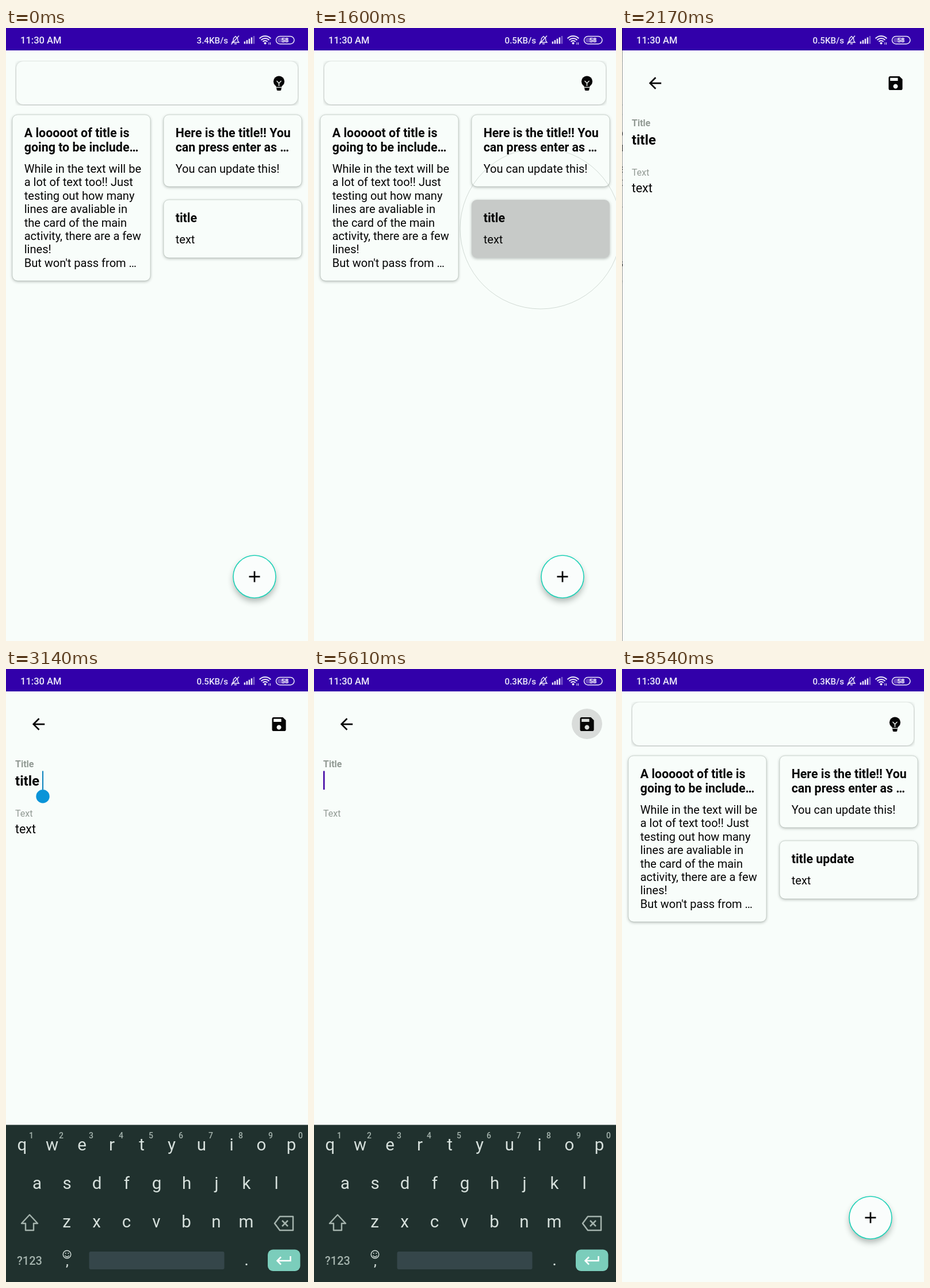
Recreate the animation shown at these times as an HTML page with a canvas. Size 525x1067 px, loop 8.57 s.

```html
<!DOCTYPE html>
<html lang="en">
<head>
<meta charset="utf-8">
<title>Notes app</title>
<style>
  html, body { margin: 0; width: 100%; height: 100%; overflow: hidden; background: #f8fdfa; }
  canvas { display: block; width: 525px; height: 1067px; }
</style>
</head>
<body>
<canvas id="stage" width="525" height="1067"></canvas>
<script>
const W = 525, H = 1067, LOOP = 8570;
const PAPER = '#f8fdfa', PURPLE = '#3200aa', INK = '#050505', HINT = '#929a94';
const ctx = document.getElementById('stage').getContext('2d');

// Moments of the interaction, in ms.
const T = { press: 1430, open: 1740, tap: 2650, keys: 2700, typing: 3500, perKey: 230,
            save: 5490, clear: 5560, close: 5770, toast: 6000, toastEnd: 8150 };
const SLIDE = 500, ADDED = 'update';

const BACK = new Path2D('M20 11H7.83l5.59-5.59L12 4l-8 8 8 8 1.41-1.41L7.83 13H20v-2z');
const DISK = new Path2D('M17 3H5c-1.11 0-2 .9-2 2v14c0 1.1.89 2 2 2h14c1.1 0 2-.9 2-2V7l-4-4z' +
  'm-5 16c-1.66 0-3-1.34-3-3s1.34-3 3-3 3 1.34 3 3-1.34 3-3 3zm3-10H5V5h10v4z');

const progress = (t, start, length) => Math.min(1, Math.max(0, (t - start) / length));
const easeOut = p => 1 - (1 - p) ** 3;

function scoped(draw) {
  ctx.save();
  draw();
  ctx.restore();
}

function text(str, x, y, size, weight = 400, color = INK, align = 'left') {
  ctx.font = `${weight} ${size}px Roboto, sans-serif`;
  ctx.fillStyle = color;
  ctx.textAlign = align;
  ctx.fillText(str, x, y);
}

function box(x, y, w, h, r, fill) {
  ctx.beginPath();
  ctx.roundRect(x, y, w, h, r);
  if (fill) {
    ctx.fillStyle = fill;
    ctx.fill();
  }
}

function disc(x, y, r, fill) {
  ctx.beginPath();
  ctx.arc(x, y, r, 0, Math.PI * 2);
  ctx.fillStyle = fill;
  ctx.fill();
}

function line(points, color, width, closed = false) {
  ctx.beginPath();
  points.forEach(([x, y]) => ctx.lineTo(x, y));
  if (closed) ctx.closePath();
  ctx.strokeStyle = color;
  ctx.lineWidth = width;
  ctx.stroke();
}

function shadow(alpha, blur, dy) {
  ctx.shadowColor = `rgba(20,30,25,${alpha})`;
  ctx.shadowBlur = blur;
  ctx.shadowOffsetY = dy;
}

function icon(path, cx, cy) {
  scoped(() => {
    ctx.translate(cx - 16, cy - 16);
    ctx.scale(1.337, 1.337);
    ctx.fillStyle = INK;
    ctx.fill(path);
  });
}

function ripple(x, y, radius, p, alpha) {
  ctx.fillStyle = `rgba(0,0,0,${alpha * p / 2})`;
  ctx.fill();
  scoped(() => {
    ctx.clip();
    disc(x, y, radius * easeOut(p), `rgba(0,0,0,${alpha / 2})`);
  });
}

function card(x, y, h, title, body, pressed = 0) {
  scoped(() => {
    shadow(0.3, 5, 1.5);
    box(x, y, 240, h, 9, PAPER);
  });
  if (pressed > 0) ripple(x + 120, y + 50, 140, pressed, 0.21);
  ctx.strokeStyle = 'rgba(150,165,155,.4)';
  ctx.lineWidth = 1;
  ctx.stroke();
  title.forEach((s, i) => text(s, x + 20.7, y + 38.8 + i * 25.1, 21.39, 700));
  const top = y + 76.4 + (title.length - 1) * 25.1;
  body.forEach((s, i) => text(s, x + 20.7, top - 0.5 + i * 23.4, 20.05));
}

function bulb() {
  disc(474.5, 93, 9.6, INK);
  box(469.5, 98, 10, 7.5, 2, INK);
  box(470.5, 104, 8, 5, 2, INK);
  line([[470.5, 92], [474.5, 96], [478.5, 92]], PAPER, 1.4);
  line([[474.5, 96], [474.5, 101]], PAPER, 1.4);
  line([[469, 103.3], [480, 103.3]], PAPER, 1.3);
}

function searchBar() {
  scoped(() => {
    ctx.beginPath();
    ctx.rect(16, 57, 493, 78);
    ctx.clip();
    shadow(0.34, 6, 1);
    box(18, 58, 489, 75, 12, PAPER);
  });
  bulb();
}

function addButton() {
  scoped(() => {
    shadow(0.32, 11, 6);
    disc(432, 955, 37, '#fafdfc');
  });
  ctx.strokeStyle = '#20d2b8';
  ctx.lineWidth = 1.6;
  ctx.stroke();
  line([[422.5, 955], [441.5, 955]], INK, 2.7);
  line([[432, 945.5], [432, 964.5]], INK, 2.7);
}

function page() {
  ctx.fillStyle = PAPER;
  ctx.fillRect(0, 0, W, H);
  ctx.fillStyle = PURPLE;
  ctx.fillRect(0, 0, W, 39);
}

function listScreen(t) {
  page();
  searchBar();
  card(11, 151, 289, ['A looooot of title is', 'going to be include…'],
    ['While in the text will be', 'a lot of text too!! Just', 'testing out how many',
     'lines are avaliable in', 'the card of the main', 'activity, there are a few',
     'lines!', 'But won\'t pass from …']);
  card(274, 151, 125, ['Here is the title!! You', 'can press enter as …'], ['You can update this!']);
  const pressed = t < T.tap ? progress(t, T.press, 160) : 0;
  card(274, 299, 101, [t < T.close ? 'title' : 'title update'], ['text'], pressed);
  addButton();
}

function caret(t, typed, title) {
  const lastEdit = t >= T.clear ? T.clear : typed ? T.typing + (typed - 1) * T.perKey : T.tap;
  const handle = !typed && t < T.clear;
  const visible = (t - lastEdit) % 1000 < 500;
  ctx.font = '700 24.06px Roboto, sans-serif';
  const x = 16 + ctx.measureText(title).width;
  if (visible) {
    ctx.fillStyle = handle ? '#0a83bd' : '#4a10a8';
    ctx.fillRect(handle ? x - 1 : x, 177.5, handle ? 2 : 2.7, 32.5);
  }
  if (handle) disc(x, 221.7, 11.7, '#0a94d8');
}

function editScreen(t) {
  page();
  if (t >= T.save) {
    const p = progress(t, T.save, 110);
    const fade = 1 - progress(t, 5700, 200);
    ctx.beginPath();
    ctx.arc(474.5, 95.5, 26.5, 0, Math.PI * 2);
    ripple(474.5, 95.5, 26.5, p, 0.13 * fade);
  }
  icon(BACK, 56.5, 96);
  icon(DISK, 474.5, 96);
  text('Title', 16, 171.3, 16.04, 700, HINT);
  text('Text', 16, 257.3, 16.04, 400, HINT);

  const typed = t < T.typing ? 0 : Math.min(ADDED.length, 1 + Math.floor((t - T.typing) / T.perKey));
  const cleared = t >= T.clear;
  const title = cleared ? '' : 'title ' + ADDED.slice(0, typed);
  text(title, 16, 203, 24.06, 700);
  if (!cleared) text('text', 16, 286.3, 21.39);
  if (t >= T.tap) caret(t, typed, title);
}

function letterRow(letters, x, y) {
  [...letters].forEach((c, i) => text(c, x + i * 52, y, 29.5, 400, '#d6e0dc', 'center'));
}

function keyboard(t) {
  const up = easeOut(progress(t, T.keys, 300)) * (1 - progress(t, T.close, 230) ** 2);
  if (up <= 0) return;
  const soft = '#a4b3ad', bright = '#d6e0dc';
  scoped(() => {
    ctx.translate(0, (1 - up) * 274);
    ctx.fillStyle = '#20312e';
    ctx.fillRect(0, 793.5, W, 274);
    letterRow('qwertyuiop', 28, 838);
    letterRow('asdfghjkl', 54, 905);
    letterRow('zxcvbnm', 105.5, 972);
    [...'1234567890'].forEach((c, i) => text(c, 44 + i * 52, 817, 14, 500, soft, 'center'));

    ctx.lineJoin = 'round';
    line([[41, 950], [55, 965], [48, 965], [48, 977], [34, 977], [34, 965], [27, 965]], soft, 2.4, true);
    line([[467, 965], [476, 953], [499, 953], [499, 977], [476, 977]], soft, 2.5, true);
    line([[480, 960], [490, 970]], soft, 2.5);
    line([[490, 960], [480, 970]], soft, 2.5);

    text('?123', 41, 1036.5, 20, 500, soft, 'center');
    ctx.strokeStyle = bright;
    ctx.lineWidth = 1.4;
    ctx.beginPath();
    ctx.arc(106, 1019, 6.8, 0, Math.PI * 2);
    ctx.stroke();
    ctx.beginPath();
    ctx.arc(106, 1019.5, 3.7, 0.3, Math.PI - 0.3);
    ctx.stroke();
    disc(103.6, 1017, 1, bright);
    disc(108.4, 1017, 1, bright);
    text(',', 106.5, 1039, 22, 500, bright, 'center');
    box(144.5, 1014, 235, 31, 3, '#35464a');
    text('.', 418, 1038, 24, 500, bright, 'center');
    box(455, 1010.5, 56.5, 37.5, 9, '#7bcdbb');
    ctx.lineJoin = 'miter';
    line([[494.5, 1022], [494.5, 1030], [472, 1030]], '#fff', 2.5);
    line([[478, 1023.5], [471.5, 1030], [478, 1036.5]], '#fff', 2.5);
  });
}

function statusIcons(t) {
  const white = '#eeeafa';
  text('11:30 AM', 25, 27, 16.5, 500, white);
  const speed = t < 1000 ? '3.4' : t < 5000 ? '0.5' : '0.3';
  text(speed + 'KB/s', 331.5, 26.7, 15.2, 500, white);

  // Muted bell
  line([[393, 25], [395, 22.5], [395.5, 18], [399, 14.5], [402.5, 18], [403, 22.5], [405, 25]], white, 1.4, true);
  line([[397, 27.5], [401, 27.5]], white, 1.5);
  line([[405, 13.5], [391.5, 28.5]], white, 1.4);

  for (let i = 0; i < 5; i++) {
    const h = 4 + i * 2.4;
    ctx.fillStyle = i < 4 ? white : 'rgba(238,234,250,.4)';
    ctx.fillRect(413.7 + i * 4, 27.5 - h, 2.5, h);
  }

  ctx.strokeStyle = white;
  ctx.lineWidth = 2;
  for (const r of [5.5, 9.5, 13.5]) {
    ctx.beginPath();
    ctx.arc(450.5, 27.5, r, -Math.PI * 0.76, -Math.PI * 0.24);
    ctx.stroke();
  }
  disc(450.5, 26.5, 2, white);
  line([[457, 25], [457, 29]], white, 1);
  line([[459.5, 25], [459.5, 29]], white, 1);

  box(469.5, 14.5, 31.5, 13.2, 6.6);
  ctx.strokeStyle = white;
  ctx.lineWidth = 1.5;
  ctx.stroke();
  box(472, 17, 18, 8.2, 4, 'rgba(238,234,250,.3)');
  text('58', 485, 25.2, 11.5, 700, white, 'center');
}

function toast(t) {
  const alpha = progress(t, T.toast, 250) * (1 - progress(t, T.toastEnd, 250));
  if (alpha <= 0) return;
  scoped(() => {
    ctx.globalAlpha = alpha;
    scoped(() => {
      shadow(0.15, 34, 19);
      box(142, 852.5, 240, 57, 16, '#fafdfb');
    });
    ctx.strokeStyle = 'rgba(120,140,130,.13)';
    ctx.lineWidth = 1;
    ctx.stroke();
    text('Note has been updated!', 262.5, 888, 18.72, 400, INK, 'center');
  });
}

function render(t) {
  const open = easeOut(progress(t, T.open, SLIDE)) - easeOut(progress(t, T.close, SLIDE));
  if (open < 1) {
    scoped(() => {
      ctx.translate(-W / 4 * open, 0);
      listScreen(t);
    });
    ctx.fillStyle = `rgba(0,0,0,${0.4 * open})`;
    ctx.fillRect(0, 0, W, H);
  }
  if (open > 0) {
    scoped(() => {
      ctx.translate(Math.round(W * (1 - open)), 0);
      editScreen(t);
    });
  }
  keyboard(t);
  toast(t);
  statusIcons(t);
}

const began = performance.now();
function tick() {
  render((performance.now() - began) % LOOP);
  requestAnimationFrame(tick);
}
tick();
</script>
</body>
</html>
```
